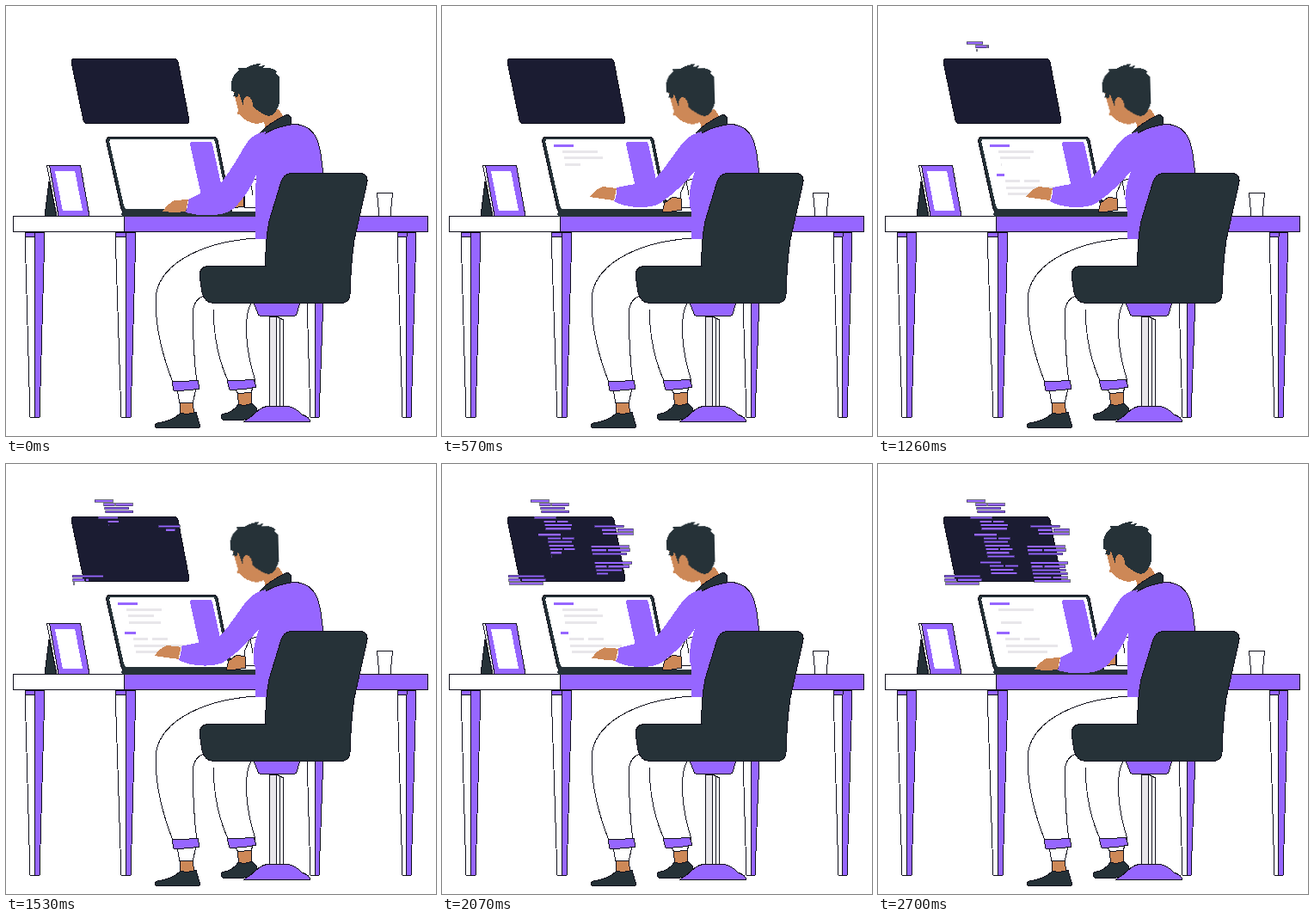
Recreate the animation shown at these times as an HTML page. Size 500x500 px, loop 2.73 s.

```html
<!DOCTYPE html>
<html lang="en">
<head>
<meta charset="utf-8">
<title>Programmer at a desk</title>
<style>
  html, body { margin: 0; width: 100%; height: 100%; overflow: hidden; background: #fff; }
  svg { display: block; width: 100vw; height: 100vh; shape-rendering: crispEdges; }
  .ink { stroke: #10101c; stroke-width: 1; stroke-linejoin: round; }
  .line { fill: none; }
  .white { fill: #fff; }
  .purple { fill: #9666ff; }
  .dark { fill: #263238; }
  .night { fill: #1b1c32; }
  .skin { fill: #cd8857; }
  .grey { fill: #e8e6ea; }
  .code { fill: #9666ff; stroke: #1b1c32; stroke-width: .6; }

  .pose { animation: 910ms ease-in-out infinite; }
  #head { transform-origin: 312px 136px; animation-name: nod; }
  #arm { animation-name: arm; }
  #hand { animation-name: hand; }
  #farHand { animation-name: farHand; }
  #torso { animation-name: torso; }

  @keyframes nod {
    0%, 5.5%, 94.5%, 100% { transform: rotate(0deg); }
    38%, 62.7% { transform: rotate(-1.7deg); }
  }
  @keyframes arm {
    0%, 5.5%, 94.5%, 100% { d: path("M302 146C283 149 279 161 270 176Q260 193 249 207L212 225Q212 233 209 240C230 246 254 244 264 236Q282 220 293 191Z"); }
    38%, 62.7% { d: path("M302 146C285 150 279 160 269 174Q258 190 246 203L203 211Q204 220 200 227C215 236 244 236 254 229Q276 214 295 191Z"); }
  }
  @keyframes hand {
    0%, 5.5%, 94.5%, 100% { d: path("M182 239Q188 230 196 226L212 225L209 239L196 240Z"); }
    38%, 62.7% { d: path("M172 222Q178 213 187 210L203 212L200 226L185 224Z"); }
  }
  @keyframes farHand {
    0%, 5.5%, 94.5%, 100% { d: path("M264 234L269 226L276 221L277 233L270 234Z"); }
    38%, 62.7% { d: path("M256 239L259 229L268 222L278 224L279 237L267 239Z"); }
  }
  @keyframes torso {
    0%, 5.5%, 94.5%, 100% { d: path("M296 147L331 137C356 137 363 152 366 172L369 196L340 271L290 271L290 235Q289 215 292 190L283 165Z"); }
    38%, 62.7% { d: path("M296 147L331 137C356 137 363 152 366 172L369 196L340 271L290 271L290 238Q283 222 295 190L283 165Z"); }
  }
</style>
</head>
<body>
<svg viewBox="0 0 500 500">
  <!-- desk -->
  <g class="ink">
    <path class="white" d="M22 263H33V478H28ZM127 263H140V478H134ZM350 340H360V478H354ZM455 263H466V478H461Z"/>
    <path class="purple" d="M33 263H45L39 478.500H33ZM139 263H151L145 478.500H140ZM359 340H369L364 478.500H359ZM465 263H477L471 478.500H465Z"/>
    <path class="purple" d="M22 263H33V268H22ZM455 263H466V268H455ZM127 263H139V268H127Z"/>
    <path class="white" d="M8.500 244.500H137V262.500H8.500Z"/>
    <path class="purple" d="M137 244.500H490.500V262.500H137Z"/>
    <path class="white" d="M431.500 217.500H449.500L447 244H434Z"/>
    <path class="dark" d="M45 244L50 204L59 244Z"/>
    <path class="white" d="M47.500 185.500H51L61 244H59Z"/>
    <path class="purple" d="M50.500 185.500H86.500L97 244H61Z"/>
  </g>
  <path class="white" d="M57 192L80 191.500L89 238L66 238.500Z"/>

  <!-- screens -->
  <path class="night ink" d="M78 61.500H196Q199 61.500 200 65L213 133Q213 136.500 210 136.500H94Q91 136.500 90 133L76 65Q76 61.500 78 61.500Z"/>
  <path class="dark ink" d="M120 152.500H241Q245 152.500 246 156L263 240H138Q135 240 134 236L116.500 157Q117 152.500 120 152.500Z"/>
  <path class="white" d="M123 154.500H239Q242 154.500 243 158L259 236H141Q138 236 137 232L120.500 159Q120 154.500 123 154.500Z"/>
  <path class="purple" d="M217 157.500H236Q239 157.500 240 161L253 220Q253 223 250 223H231Q228 223 227 220L214 161Q214 157.500 217 157.500Z"/>
  <g id="text"></g>
  <g id="code"></g>
  <path class="dark" d="M137 239H290V244.500H135Q133 241 137 239Z"/>

  <!-- far arm -->
  <path class="white ink" d="M277 218L284 203L292 201V234H277Z"/>
  <path class="line ink" d="M284 203L287 220"/>
  <path id="farHand" class="skin ink pose"/>

  <!-- legs -->
  <g class="ink">
    <path class="white" d="M241 353Q242 403 260 440L290 436C278 399 276 362 285 346"/>
    <path class="white" d="M303 270H290C222 275 174 303 174 343C174 382 187 420 195 440L222 438Q217 398 217.500 356Q218 337 239 335"/>
    <path class="white" d="M199 446L202 462H217L221 445ZM265 444L270 451L285 450L287 443Z"/>
    <path class="skin" d="M202 461H217L219 475H203ZM269 451L285 449L286 464H271Z"/>
    <path class="purple" d="M193 437Q209 437 223 435L225 445Q210 448 195 447ZM257 436Q273 436 288 434L291 443Q275 447 260 446Z"/>
    <path class="dark" d="M203 473Q212 476 221 472L225 486V490H174Q172 487 176 485Q195 482 203 473ZM270 463Q278 466 286 462L291 467V479L277 481H252Q249 479 251 475Q265 472 270 463Z"/>
  </g>

  <!-- body -->
  <path id="torso" class="purple pose"/>
  <path class="line ink" d="M331 137C356 137 363 152 366 172L369 196"/>
  <path class="skin" d="M299 124L317 120L323 129L301 141Z"/>
  <g id="head" class="pose">
    <path class="skin" d="M267 96L265 101L270 121L269 126H272Q278 135 291 137Q304 136 310 126L304 98Z"/>
    <path class="dark" d="M264 105L266 100L262 99Q260 82 271 75L270 72L279 72Q287 67 296 67L294 70L301 69L299 72Q309 71 315 76L313 78L318 83V112Q315 126 306 128Q297 126 286 116L276 117L271 101L269 106Z"/>
    <path class="skin" d="M276 117Q275 105 281 105Q287 107 287 117L282 121Z"/>
  </g>
  <path class="dark ink" d="M295 148Q304 137 327 126L331 129L331 138Q313 141 300 149Z"/>
  <path id="hand" class="skin pose"/>
  <path id="arm" class="purple pose"/>

  <!-- chair -->
  <g class="ink">
    <path class="grey" d="M306 361H315V467H306Z"/>
    <path class="white" d="M314.500 361L322.500 365V467H314.500Z"/>
    <path class="line" d="M318.500 363V466"/>
    <path class="purple" d="M288 345H342L338 358Q337 360.500 334 360.500H297Q294 360.500 293 358Z"/>
    <path class="purple" d="M276 483.500Q284 479 290 473Q298 465 308 465H325Q336 466 344 475Q353 478 354 483.500Z"/>
    <path class="dark" d="M332 194.500H412Q421 195 420 205L405 272Q401 300 400 336Q399 345.500 389 345.500H241Q231 345 228 333L225 314Q225 303 235 302.500H302Q301 276 306 250L320 204Q323 195 332 194.500Z"/>
  </g>
</svg>
<script>
  const LOOP = 2730, STEP = 30;
  const SLANT = .22;

  const clamp = (v, max = 1) => Math.max(0, Math.min(max, v));

  let seed = 7;
  const random = () => (seed = seed * 16807 % 2147483647) / 2147483647;

  // A bar whose width follows size(t)
  function bar(layer, cls, x, y, height, size) {
    const el = document.createElementNS("http://www.w3.org/2000/svg", "rect");
    const attrs = { class: cls, x, y, height };
    for (const name in attrs) el.setAttribute(name, attrs[name]);
    document.getElementById(layer).append(el);
    const frames = [];
    for (let t = 0; t <= LOOP; t += STEP) frames.push({ width: size(t) + "px" });
    el.animate(frames, { duration: LOOP, iterations: Infinity });
  }

  // A line of writing, optionally broken by a gap
  function line(layer, cls, x, y, height, width, shown, split = width, gap = 0) {
    bar(layer, cls, x, y, height, t => clamp(width * shown(t), split));
    const skip = split + gap;
    if (skip < width) bar(layer, cls, x + skip, y, height, t => clamp(width * shown(t) - skip, width - skip));
  }

  // Laptop lines: width, then the moments when each is deleted and retyped
  const notes = [
    [23, 950, 2340], [41, 845, 1740, 2500], [45, 1400, 1650, 2700], [37, 1260, 2585],
    [15, 1375, 2190], [40, 2310], [60, 2265], [46, 2340]
  ];
  notes.forEach(([width, ...edits], i) => {
    const heading = i % 4 === 0;
    const drop = i * 7.4 + (i > 3 ? 4.8 : 0);
    const x = 130 + drop * SLANT + (heading ? 0 : 8.5);
    const start = 800 * Math.sin(i / 7 * Math.PI / 2);
    const shown = t => Math.min(clamp((t - start) / 150), ...edits.map(e => Math.abs(t - e) / 180));
    line("text", heading ? "purple" : "grey", x, 160.5 + drop, 3, width, shown, i === 5 ? 17 : width, 5);
  });

  // Code columns: each paragraph has a number of rows, the first one outdented
  const columns = [
    { x: 103, y: 43, width: 30, start: 1127, indent: 10, gap: 2.8, rows: [4, 4, 7, 4] },
    { x: 177, y: 72.5, width: 35, start: 1420, indent: 8, gap: 0, rows: [3] },
    { x: 173, y: 96, width: 41, start: 1620, indent: 0, gap: 6.4, rows: [3, 6] },
    { x: 77, y: 130.5, width: 40, start: 1400, indent: 0, gap: 0, rows: [3] }
  ];
  for (const { x, y, width, start, indent, gap, rows } of columns) {
    let top = y, begin = start;
    for (const count of rows) {
      for (let i = 0; i < count; i++) {
        const from = begin;
        const w = width + random() * 8 - 4 - (i ? 0 : indent / 2);
        const split = i % 3 === 1 ? w * (.3 + random() * .25) : w;
        const left = x + (top - y) * SLANT + (i ? indent : 0);
        line("code", "code", left, top - 1.3, 2.6, w, t => clamp((t - from) / 150), split, 1.5);
        top += 4.2;
        begin += 67;
      }
      top += gap;
    }
  }
</script>
</body>
</html>
```
